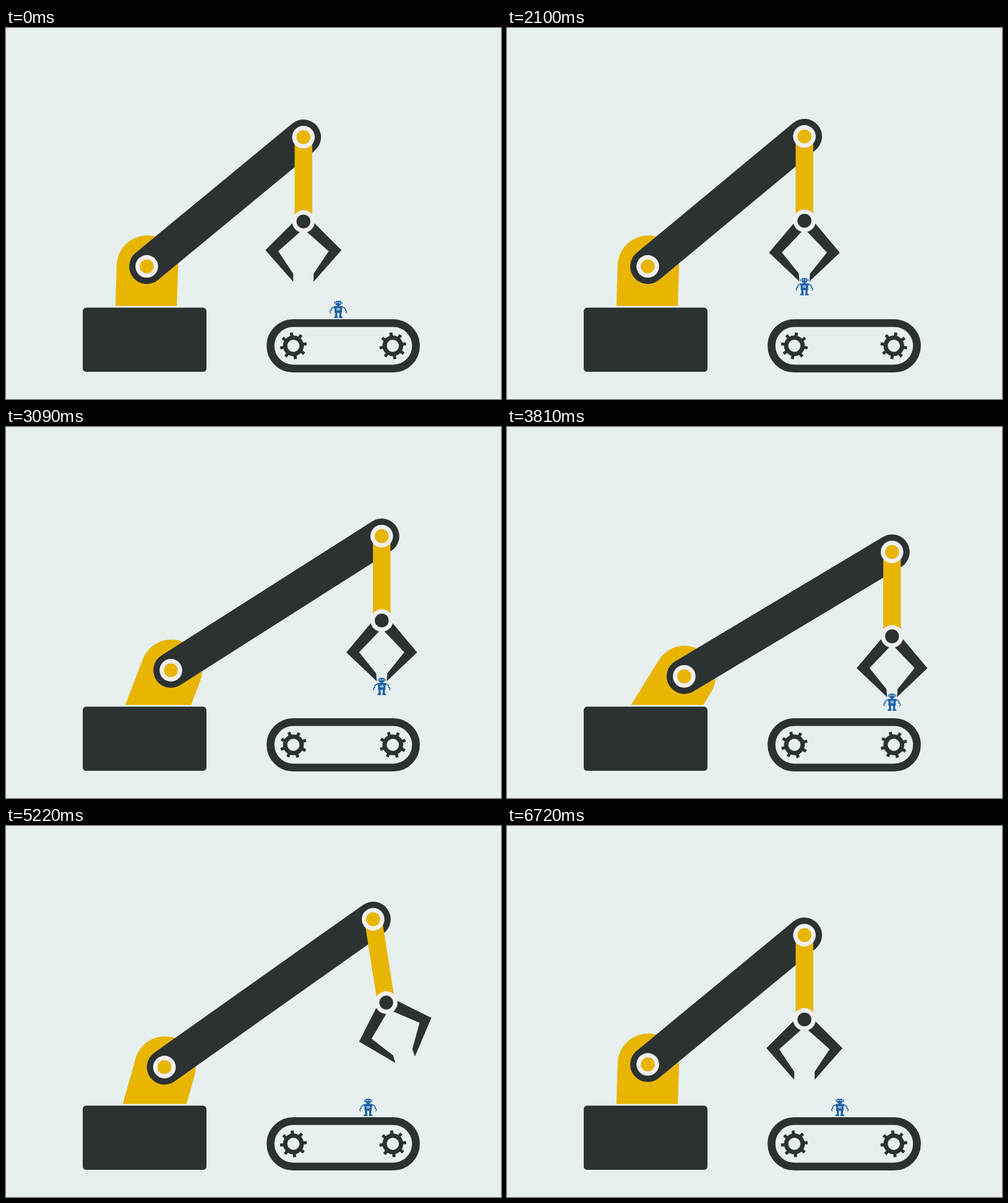
Write an HTML page that moves like this. It is 800 by 600 pixels and loops after 6750 ms.

```html
<!DOCTYPE html>
<html lang="en">
<head>
<meta charset="utf-8">
<title>Robot arm</title>
<style>
  html, body { margin: 0; width: 100%; height: 100%; overflow: hidden; background: #e7f0ee; }
  svg { display: block; width: 800px; height: 600px; }
  .dark { fill: #2b3231; }
  .gold { fill: #e8b500; }
  .pale { fill: #f2eff0; }
  .blue { fill: #2062a8; }
  .line { fill: none; stroke: #2b3231; }
</style>
</head>
<body>
<svg viewBox="0 0 800 600">
  <defs>
    <clipPath id="aboveBase"><rect width="800" height="449.5"/></clipPath>
    <path id="jaw" d="M8 -7 L18.6 3.6 L61.5 46.3 L16.6 97.3 L16.4 84.5 L40.8 48 L6 17.3 L-2 10 Z"/>
    <g id="gear">
      <circle class="line" r="13.3" stroke-width="7"/>
      <g id="teeth"></g>
    </g>
  </defs>

  <g clip-path="url(#aboveBase)">
    <path id="shoulder" class="gold" d="M175.3 530 V385.1 A49.6 49.6 0 0 1 274.5 385.1 V530 Z"/>
  </g>
  <rect class="dark" x="124" y="452.3" width="200" height="103.7" rx="5.5"/>

  <rect class="line" x="427.5" y="477.3" width="235" height="73.4" rx="36.7" stroke-width="12.6"/>
  <use class="gear" href="#gear"/>
  <use class="gear" href="#gear"/>

  <line id="arm" class="line" stroke-width="56.8" stroke-linecap="round"/>
  <g id="shoulderJoint">
    <circle class="pale" r="18.3"/><circle class="gold" r="11.2"/>
  </g>
  <g id="forearm">
    <rect class="gold" x="-14.2" width="28.4" height="136.4"/>
    <circle class="pale" r="18.3"/><circle class="gold" r="11.2"/>
    <g id="claw" class="dark">
      <use id="jawRight" href="#jaw"/>
      <use id="jawLeft" href="#jaw"/>
      <circle class="pale" r="18.3"/><circle r="11.2"/>
    </g>
  </g>

  <g id="robot" class="blue">
    <rect x="-4.2" y="0.2" width="8.4" height="7" rx="0.8"/>
    <path d="M-6.4 1.2 L-5 2 V5 L-6.4 5.8 Z M6.4 1.2 L5 2 V5 L6.4 5.8 Z"/>
    <rect x="-2" y="7" width="4" height="2"/>
    <rect x="-7" y="8.6" width="14" height="4" rx="1.4"/>
    <rect x="-6" y="9" width="12" height="10.6"/>
    <path d="M-5 19 H-1.6 V25 Q-0.8 25.6 -0.8 28 H-7.4 Q-7.2 25.8 -5 25 Z
             M5 19 H1.6 V25 Q0.8 25.6 0.8 28 H7.4 Q7.2 25.8 5 25 Z"/>
    <g fill="none" stroke="#2062a8" stroke-width="1.6">
      <path d="M-6.4 10 Q-11.6 11 -11.8 16 M6.4 10 Q11.6 11 11.8 16"/>
      <path d="M-10.4 16.2 Q-14 15.4 -13.4 18.6 L-12 20.2 M10.4 16.2 Q14 15.4 13.4 18.6 L12 20.2" stroke-width="1.3"/>
    </g>
    <g fill="#e7f0ee">
      <circle cx="-1.8" cy="3.2" r="1"/><circle cx="1.8" cy="3.2" r="1"/>
      <rect x="-2.6" y="12" width="5.2" height="3.4"/>
    </g>
    <path d="M-1.8 12.8 h1.4 v1.8 h-1.4 Z M0.4 12.8 h1.4 v1.8 h-1.4 Z"/>
  </g>
</svg>

<script>
const LOOP = 6750, STEP = 30;
const BELT_SPEED = 0.0316;
const GRAB = 1782, RELEASE = 4050;
const NEAR_X = 480.7, FAR_X = 622.3;
const REST_Y = 176.5, LOW_Y = 212.1;
const FOREARM = 136.4, GRIP = 92.6, BELT_Y = 441;

// Each track is a list of [time, value] keys, eased between neighbours.
const tracks = {
  baseAngle: [[2610, 1.7], [3420, 32], [3660, 32], [6630, 1.7]],
  elbowX: [[2105, NEAR_X], [3340, FAR_X], [4860, FAR_X], [6098, NEAR_X]],
  elbowY: [[1090, REST_Y], [1775, LOW_Y], [1785, LOW_Y], [1990, 163.6], [2125, REST_Y],
           [3375, REST_Y], [4044, LOW_Y], [4100, LOW_Y], [4820, REST_Y], [4870, REST_Y],
           [5360, 144.5], [6015, REST_Y]],
  swing: [[4890, 0], [5600, 20], [5700, 20], [6450, 0]],
  clawTilt: [[4400, 0], [5320, 9.7], [5780, 9.7], [6500, 0]],
  grip: [[1620, 0], [1785, 5], [4045, 5], [4205, 0]]
};

const $ = id => document.getElementById(id);
const place = (node, value) => node.setAttribute("transform", value);

function sample(keys, t) {
  if (t <= keys[0][0]) return keys[0][1];
  for (let i = 1; i < keys.length; i++) {
    const [t0, v0] = keys[i - 1], [t1, v1] = keys[i];
    if (t < t1) {
      const u = (t - t0) / (t1 - t0);
      return v0 + (v1 - v0) * u * u * (3 - 2 * u);
    }
  }
  return keys[keys.length - 1][1];
}

function robotPosition(t, x, y) {
  if (t < GRAB) return [NEAR_X + (GRAB - t) * BELT_SPEED, BELT_Y];
  if (t < RELEASE) return [x, Math.min(BELT_Y, y + FOREARM + GRIP)];
  return [FAR_X - (t - RELEASE) * BELT_SPEED, BELT_Y];
}

function render(t) {
  const pose = {};
  for (const name in tracks) pose[name] = sample(tracks[name], t);
  const { baseAngle, elbowX, elbowY, swing, clawTilt, grip } = pose;

  const a = baseAngle * Math.PI / 180;
  const shoulderX = 224 + 118.5 * Math.sin(a);
  const shoulderY = 504 - 118.5 * Math.cos(a);
  place($("shoulder"), `rotate(${baseAngle} 224 504)`);
  place($("shoulderJoint"), `translate(${shoulderX} ${shoulderY})`);

  const ends = { x1: shoulderX, y1: shoulderY, x2: elbowX, y2: elbowY };
  for (const key in ends) $("arm").setAttribute(key, ends[key]);

  place($("forearm"), `translate(${elbowX} ${elbowY}) rotate(${-swing})`);
  place($("claw"), `translate(0 ${FOREARM}) rotate(${-clawTilt})`);
  place($("jawRight"), `rotate(${grip})`);
  place($("jawLeft"), `scale(-1 1) rotate(${grip})`);
  place($("robot"), `translate(${robotPosition(t, elbowX, elbowY).join(" ")})`);

  const turn = 36 - 810 * t / LOOP;
  document.querySelectorAll(".gear").forEach((gear, i) =>
    place(gear, `translate(${464.5 + 160.7 * i} 514) rotate(${turn})`));
}

$("teeth").innerHTML = Array.from({ length: 8 }, (_, i) =>
  `<rect class="dark" x="15" y="-2.5" width="6.6" height="5" transform="rotate(${i * 45})"/>`).join("");

const start = performance.now();
function tick() {
  const t = Math.floor(((performance.now() - start) % LOOP) / STEP) * STEP;
  render(t < 60 ? 0 : t);
  requestAnimationFrame(tick);
}
tick();
</script>
</body>
</html>
```
